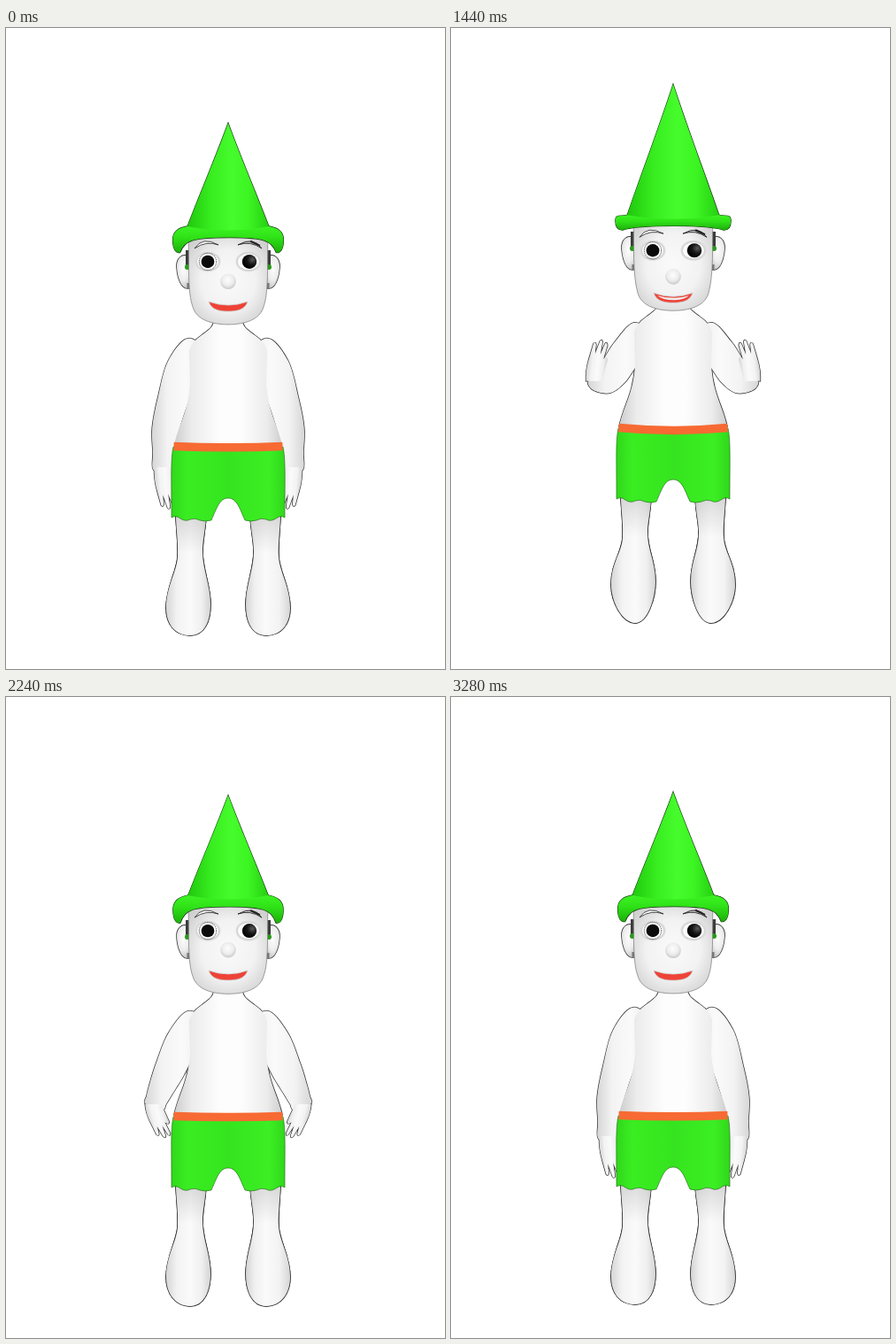
An HTML page that plays this animation: 496x724 px, repeating every 3360 ms.

```html
<!DOCTYPE html>
<html lang="en">
<head>
<meta charset="utf-8">
<title>Jumping figure</title>
<style>
html, body { margin: 0; width: 100%; height: 100%; overflow: hidden; background: #fff; }
svg { display: block; width: 496px; height: 724px; }
</style>
</head>
<body>
<svg viewBox="0 0 496 724">
  <defs>
    <linearGradient id="skin">
      <stop offset="0" stop-color="#cdcdcd"/><stop offset=".16" stop-color="#ececec"/>
      <stop offset=".42" stop-color="#fdfdfd"/><stop offset=".62" stop-color="#fdfdfd"/>
      <stop offset=".86" stop-color="#ececec"/><stop offset="1" stop-color="#cdcdcd"/>
    </linearGradient>
    <radialGradient id="head" cx=".5" cy=".5" r=".62">
      <stop offset="0" stop-color="#fafafa"/><stop offset=".55" stop-color="#f2f2f2"/>
      <stop offset="1" stop-color="#cfcfcf"/>
    </radialGradient>
    <linearGradient id="limb">
      <stop offset="0" stop-color="#d6d6d6"/><stop offset=".25" stop-color="#f3f3f3"/>
      <stop offset=".55" stop-color="#fafafa"/><stop offset=".8" stop-color="#f0f0f0"/>
      <stop offset="1" stop-color="#d4d4d4"/>
    </linearGradient>
    <linearGradient id="shade" x2="0" y2="1">
      <stop offset="0" stop-color="#888" stop-opacity=".4"/>
      <stop offset=".4" stop-color="#888" stop-opacity="0"/>
    </linearGradient>
    <linearGradient id="cone">
      <stop offset="0" stop-color="#20c80c"/><stop offset=".3" stop-color="#38ee20"/>
      <stop offset=".55" stop-color="#46fc2c"/><stop offset=".75" stop-color="#3df523"/>
      <stop offset="1" stop-color="#25cf10"/>
    </linearGradient>
    <linearGradient id="brim" x2="0" y2="1">
      <stop offset="0" stop-color="#3cf322"/><stop offset=".4" stop-color="#30e318"/>
      <stop offset="1" stop-color="#1cb00a"/>
    </linearGradient>
    <linearGradient id="cloth">
      <stop offset="0" stop-color="#30d81a"/><stop offset=".14" stop-color="#3aed22"/>
      <stop offset=".5" stop-color="#35e41e"/><stop offset=".86" stop-color="#3cee24"/>
      <stop offset="1" stop-color="#30d81a"/>
    </linearGradient>
    <radialGradient id="ball" cx=".48" cy=".4" r=".6">
      <stop offset="0" stop-color="#fdfdfd"/><stop offset=".6" stop-color="#ededed"/>
      <stop offset="1" stop-color="#c9c9c9"/>
    </radialGradient>
    <radialGradient id="iris" cx=".7" cy=".35" r=".7">
      <stop offset="0" stop-color="#5a5a5a"/><stop offset=".5" stop-color="#161616"/>
      <stop offset="1" stop-color="#000"/>
    </radialGradient>
    <path id="hand" d="M-9,-4C-11,10-9,18-8,24L-5,40Q-3,43-2,39L-2,28L2,43Q4,46 5,42L4,27L8,40Q10,43 11,38L8,22Q12,27 13,21L11,8L9,-4Z"/>
    <g id="side">
      <path id="leg" fill="url(#limb)"/>
      <path id="knee" fill="url(#shade)"/>
      <path id="arm" fill="url(#limb)"/>
      <use id="palm" href="#hand" fill="url(#limb)"/>
      <path fill="url(#ball)" d="M-43,-208C-52,-214-59,-206-58,-196C-57,-184-53,-173-46,-173L-42,-180Z"/>
    </g>
    <g id="body">
      <use href="#side"/>
      <use href="#side" transform="scale(-1,1)"/>
      <path fill="url(#skin)" d="M-16,-142C-15,-130-20,-127-30,-120Q-42,-112-44,-102L-43,-66C-45,-32-56,-20-61,4L61,4C56,-20 45,-32 43,-66L44,-102Q42,-112 30,-120C20,-127 15,-130 16,-142Z"/>
    </g>
    <g id="cap">
      <path id="hat" fill="url(#cone)"/>
      <path id="rim" fill="url(#brim)"/>
    </g>
    <g id="gear">
      <path d="M-46,-216v20" stroke="#3b3b3b" stroke-width="4"/>
      <circle cx="-46" cy="-197" r="3" fill="#279a18"/>
      <path d="M-45,-179v7" stroke="#777" stroke-width="3"/>
    </g>
    <g id="eye">
      <ellipse rx="14.5" ry="11.5" fill="#dcdcdc"/>
      <ellipse rx="12.5" ry="9.6" fill="#fdfdfd" stroke="#bbb" stroke-width=".6"/>
    </g>
  </defs>
  <g id="figure">
    <use href="#body" stroke="#333" stroke-width="1.5"/>
    <use href="#body"/>
    <path id="shorts" fill="url(#cloth)" stroke="#1d5f14" stroke-width=".6"/>
    <path id="band" fill="none" stroke="#f76a33" stroke-width="9.5"/>
    <use href="#gear"/>
    <use href="#gear" transform="scale(-1,1)"/>
    <path id="face" fill="url(#head)" stroke="#777" stroke-width=".7"/>
    <g id="eyes">
      <use href="#eye" x="-23"/>
      <use href="#eye" x="23"/>
      <circle cx="-23" r="9.7" fill="none" stroke="#333" stroke-width=".8" stroke-dasharray="1.4 .8"/>
      <ellipse cx="-23" rx="7.4" ry="7.2" fill="#0b0b0b"/>
      <ellipse cx="24" rx="8.2" ry="8" fill="url(#iris)"/>
      <path d="M-38,-15Q-29,-29-11,-19Q-25,-24-38,-15Z" fill="#fff" stroke="#222" stroke-width=".8"/>
      <path d="M38,-15Q29,-29 11,-19Q25,-24 38,-15Z" fill="#ccc" stroke="#222" stroke-width=".9"/>
      <path d="M25,-23L36,-18" stroke="#222" stroke-width="2"/>
    </g>
    <g id="mouth">
      <path d="M-22,-5Q0,3 22,-5C19,5 8,6 0,6S-19,5-22,-5Z" fill="#ee4337" stroke="#cfcfcf" stroke-width=".8"/>
      <path id="teeth" d="M-18,-2Q0,3 18,-2Q12,3 0,3T-18,-2Z" fill="#eee"/>
    </g>
    <circle id="nose" r="8.8" fill="url(#ball)"/>
    <use href="#cap" stroke="#1a3d14" stroke-width="1.3"/>
    <use href="#cap"/>
  </g>
</svg>
<script>
const LOOP = 3360, STEP = 80;
const $ = id => document.getElementById(id);
const set = (id, name, value) => $(id).setAttribute(name, value);
const mix = (a, b, k) => Array.isArray(a) ? a.map((v, i) => mix(v, b[i], k)) : a + (b - a) * k;

// Arm poses: centre line as [x, y, radius], then the hand's lean and vertical stretch.
const down = [[-30,-103,19], [-51,-82,19], [-63,-45,17], [-71,-13,15], [-73,13,12], [-74,33,10], [.08,.97]];
const low = [[-30,-101,18], [-51,-79,19], [-66,-47,17], [-76,-25,14], [-81,-13,12], [-84,-5,10], [.2,.78]];
const mid = [[-30,-100,18], [-52,-80,18], [-68,-56,17], [-78,-46,14], [-86,-46,10], [-89,-51,8], [.1,-.96]];
const bent = [[-36,-95,15], [-57,-88,15], [-80,-85,20], [-86,-105,15], [-88,-125,10], [-88,-138,9], [.08,-1.05]];
const high = [[-36,-91,12], [-53,-99,14], [-70,-118,17], [-79,-141,16], [-81,-171,11], [-81,-193,8.5], [.12,-1]];

// Keys: time, waist height, foot height, head tilt (0 bowed, 1 thrown back), arms.
const bounce = [
  [0, 446, 672, .84, mid], [80, 458, 678, 1, low], [160, 474, 690, .7, down],
  [240, 468, 688, .3, low], [320, 443, 668, .05, bent], [400, 426, 656, .2, bent],
  [480, 421, 653, .47, high]
];
const again = start => bounce.map(([t, ...pose]) => [t + start, ...pose]);
const keys = [
  [0, 467, 686, .35, down], [560, 467, 686, .35, down], [720, 475, 690, .59, down],
  [800, 478, 691, .5, down], [880, 470, 689, .2, down], [960, 455, 679, 0, low],
  [1040, 435, 664, 0, bent], [1120, 422, 655, .12, bent], [1200, 421, 652, .42, high],
  [1280, 429, 658, .65, high], [1360, 438, 665, .78, mix(high, mid, .6)],
  ...again(1440), ...again(2000), ...again(2560),
  [3120, 454, 677, .9, low], [3200, 476, 691, .6, down],
  [3280, 467, 686, .35, down], [LOOP, 467, 686, .35, down]
];

function poseAt(t) {
  const i = keys.findIndex(key => key[0] > t);
  const a = keys[i - 1], b = keys[i];
  return mix(a, b, (t - a[0]) / (b[0] - a[0]));
}

// Closed Catmull-Rom curve through the points.
function smooth(points) {
  const n = points.length, at = i => points[(i + n) % n];
  let d = `M${points[0]}`;
  for (let i = 0; i < n; i++) {
    const [a, b, c, e] = [at(i - 1), at(i), at(i + 1), at(i + 2)];
    d += `C${b.map((v, j) => v + (c[j] - a[j]) / 6)} ${c.map((v, j) => v - (e[j] - b[j]) / 6)} ${c}`;
  }
  return d + "Z";
}

function tube(line) {
  const left = [], right = [];
  line.forEach(([x, y, r], i) => {
    const a = line[Math.max(i - 1, 0)], b = line[Math.min(i + 1, line.length - 1)];
    const dx = b[0] - a[0], dy = b[1] - a[1], k = r / Math.hypot(dx, dy);
    left.push([x + dy * k, y - dx * k]);
    right.unshift([x - dy * k, y + dx * k]);
  });
  return smooth([...left, ...right]);
}

// A stretched leg points its toes and carries its calf higher.
function legPath(foot) {
  const hem = 78, length = foot - hem, stretch = (length - 141) / 12;
  const y = u => hem + u * length;
  const toe = 17 - 5 * stretch, calf = .78 - .12 * stretch, knee = .37 - .04 * stretch;
  return `M-60,${y(-.1)}C-59,${y(.15)} -56,${y(knee - .12)} -57,${y(knee)}` +
    `C-58,${y(knee + .12)} -70,${y(calf - .17)} -70,${y(calf)}` +
    `C-70,${y(calf + .13)} ${-43 - toe},${foot} -43,${foot}` +
    `C${-43 + toe},${foot} -20,${y(calf + .1)} -20,${y(calf - .03)}` +
    `C-20,${y(calf - .18)} -29,${y(knee + .1)} -29,${y(knee - .04)}` +
    `C-29,${y(.22)} -24,${y(.12)} -24,${y(-.1)}Z`;
}

function drawHead(p) {
  const chin = -136 + 11 * p, tip = -335 - 54 * p ** .75;
  const top = -250 + 17 * p, under = -236 + 16 * p, end = -205 - 14 * Math.sqrt(p);
  const w = 60.5 + 5.5 * p, base = 42 + 12 * p, lip = w - 8;
  const height = top - tip;
  set("face", "d", `M-45,-232C-44,-200 -46,-168 -40,${chin - 20}C-36,${chin - 5} -18,${chin} 0,${chin}` +
    `S36,${chin - 5} 40,${chin - 20}C46,-168 44,-200 45,-232Z`);
  set("eyes", "transform", `translate(0,${-209 + 17 * p})`);
  set("nose", "cy", -192 + 32 * p);
  set("mouth", "transform", `translate(0,${-161 + 23 * p})`);
  set("teeth", "opacity", Math.max(0, Math.min(1, (p - .45) * 5)));
  set("hat", "d", `M0,${tip}C${base * .33},${tip + height * .36} ${base * .75},${top - height * .25} ${base},${top + 2}` +
    `V${top + 8}H${-base}V${top + 2}C${-base * .75},${top - height * .25} ${-base * .33},${tip + height * .36} 0,${tip}Z`);
  set("rim", "d", `M${-w},-228C${-w},-236 ${-w + 5},${top + 3} ${-base},${top + 1}Q0,${top + 10} ${base},${top + 1}` +
    `C${w - 5},${top + 3} ${w},-236 ${w},-228C${w},${end - 5} ${w - 2},${end} ${lip},${end}` +
    `C${lip - 5},${under + 3} 40,${under} 0,${under}S${5 - lip},${under + 3} ${-lip},${end}` +
    `C${2 - w},${end} ${-w},${end - 5} ${-w},-228Z`);
}

function draw(t) {
  const [, waist, foot, tilt, arm] = poseAt(t);
  const line = arm.slice(0, 6), [lean, stretch] = arm[6], [wx, wy] = line[5];
  const leg = legPath(foot - waist);
  set("figure", "transform", `translate(251,${waist})`);
  set("arm", "d", tube(line));
  set("palm", "transform", `matrix(1,0,${lean},${stretch},${wx},${wy})`);
  set("leg", "d", leg);
  set("knee", "d", leg);
  set("band", "d", `M-61.5,5.5Q0,${5.5 + 7 * tilt} 61.5,5.5`);
  set("shorts", "d", "M-62,6C-65,22-64,35-64,86Q-59,83-54,87Q-48,91-43,88Q-37,86-32,89Q-26,91-19,89" +
    "C-13,76-10,64 0,64S13,76 19,89Q26,91 32,89Q37,86 43,88Q48,91 54,87Q59,83 64,86C64,35 65,22 62,6Z");
  drawHead(tilt);
}

const begin = performance.now();
function frame() {
  const t = (performance.now() - begin) % LOOP;
  draw(Math.floor(t / STEP) * STEP);
  requestAnimationFrame(frame);
}
frame();
</script>
</body>
</html>
```
